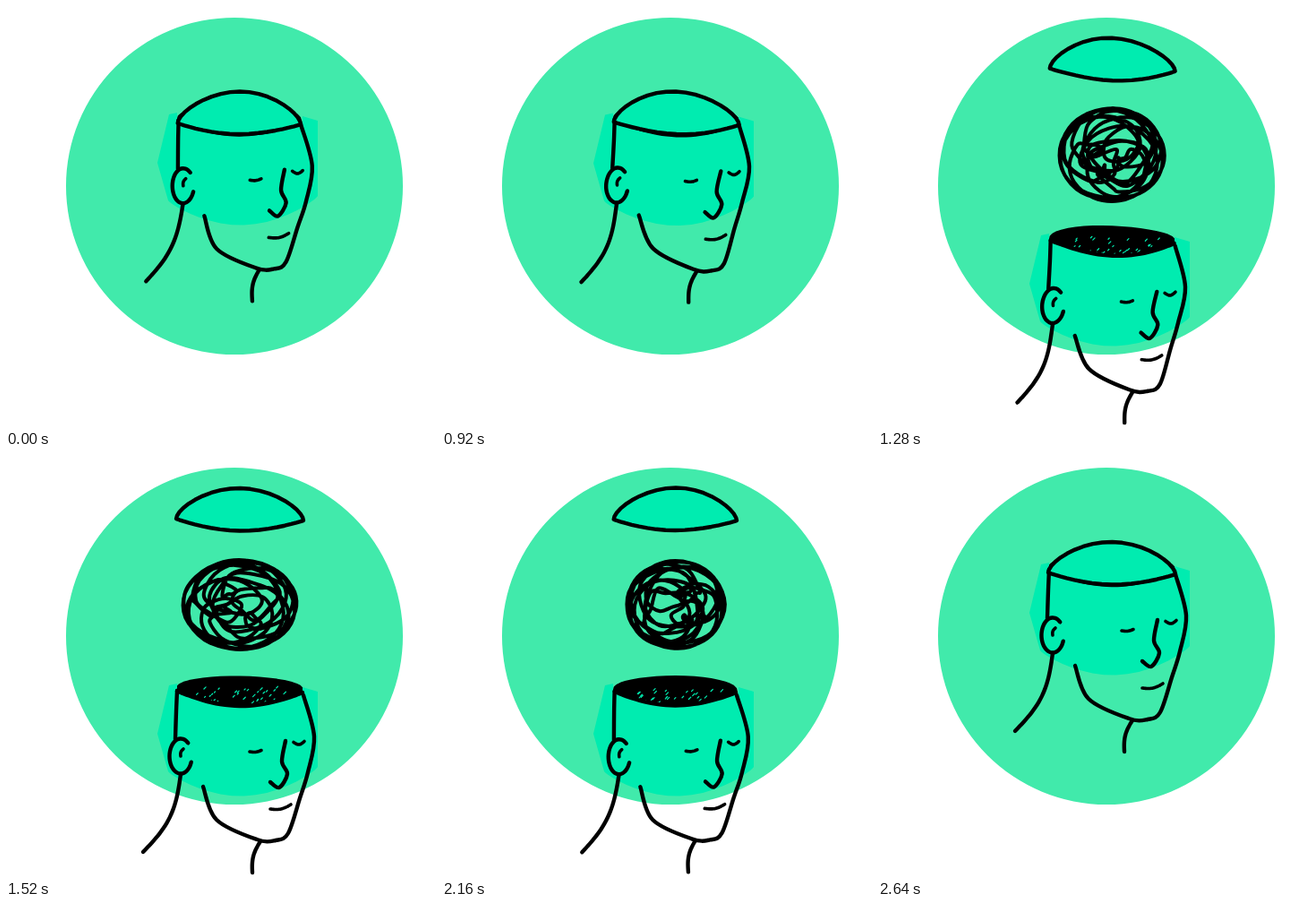
Write an HTML page with a canvas that moves like this. It is 480 px wide and 471 px high and loops after 2680 ms.

```html
<!DOCTYPE html>
<html lang="en">
<head>
<meta charset="utf-8">
<title>Open mind</title>
<style>
html, body { margin: 0; width: 100%; height: 100%; overflow: hidden; background: #fff; }
canvas { display: block; width: 480px; height: 471px; }
</style>
</head>
<body>
<canvas id="stage" width="480" height="471"></canvas>
<script>
const ctx = document.getElementById('stage').getContext('2d');
const LOOP = 2680, STEP = 40, HOLD = 120;
const GREEN = '#41eaab', TEAL = '#00ecb0', INK = '#000';

function random(seed) {
  return () => (seed = (seed * 16807 + 11) % 2147483647) / 2147483647;
}

// Arc of points between two ends; a lower power gives a flatter top.
function arch(x1, y1, x2, y2, rise, power = 1) {
  const dx = x2 - x1, dy = y2 - y1, len = Math.hypot(dx, dy), pts = [], n = 20;
  for (let i = 0; i <= n; i++) {
    const u = (1 - Math.cos(Math.PI * i / n)) / 2;
    const h = rise * Math.abs(Math.sin(Math.PI * u)) ** power / len;
    pts.push([x1 + dx * u + dy * h, y1 + dy * u - dx * h]);
  }
  return pts;
}

function oval(x, y, rx, ry, from, to) {
  const pts = [], n = 20;
  for (let i = 0; i <= n; i++) {
    const a = from + (to - from) * i / n;
    pts.push([x + rx * Math.cos(a), y + ry * Math.sin(a)]);
  }
  return pts;
}

// Smooth path through the points.
function smooth(pts) {
  const path = new Path2D();
  path.moveTo(...pts[0]);
  for (let i = 0; i < pts.length - 1; i++) {
    const b = pts[i], c = pts[i + 1], a = pts[i - 1] || b, d = pts[i + 2] || c;
    path.bezierCurveTo(
      b[0] + (c[0] - a[0]) / 6, b[1] + (c[1] - a[1]) / 6,
      c[0] - (d[0] - b[0]) / 6, c[1] - (d[1] - b[1]) / 6, c[0], c[1]);
  }
  return path;
}

function shape(pts) {
  const path = new Path2D();
  pts.forEach(p => path.lineTo(...p));
  path.closePath();
  return path;
}

// The closed head; the rim is where the skull opens.
const lid = [...arch(190, 130, 332, 132, 35, 0.6), ...arch(190, 130, 332, 132, -12.5, 0.9).reverse()];
const rimBack = arch(191, 127, 331, 129, 15.5, 0.35);
const rimFront = arch(191, 127, 331, 129, -16, 0.9);
const bold = [
  rimFront,
  [[191, 127], [190, 150], [189, 181]],
  oval(195, 200, 12.5, 19.5, -0.85, 0.35 - 2 * Math.PI),
  arch(195, 220, 153, 307, 10),
  [[220, 234], [235, 271], [280, 293], [301, 294], [315, 286], [328, 247], [337, 218], [344, 178], [332, 132]],
  arch(284, 295, 275, 330, -3.5),
  [[312, 183], [308, 206], [314, 220], [305, 235], [295, 229]]
];
const fine = [
  arch(198, 192, 195, 200, -1.4),
  arch(272, 195, 285, 193.5, -1.2),
  arch(321, 184.5, 333, 183.5, -3),
  arch(295, 259, 318, 254, -2.5)
];
const patch = shape([
  [348, 128], [331, 123], ...[...rimFront].reverse(), [191, 119], [182, 121], [169, 175],
  ...arch(181, 217, 348, 212, -30, 0.8)
]);

function speckle(seed) {
  const rnd = random(seed), path = new Path2D();
  for (let i = 0; i < 40; i++) {
    const x = 212 + rnd() * 112, y = 143 - rnd() ** 1.5 * 20, s = 1 + rnd() * 1.5;
    path.moveTo(x, y);
    path.lineTo(x + s, y - s);
  }
  return path;
}

// A redrawn head: slightly narrower and wavier than the base.
function redraw({ width, wave }, i) {
  const warp = pts => pts.map(([x, y]) => [
    260 + (x - 260) * width + wave * Math.sin(y / 25 + i),
    y + wave * Math.cos(x / 30 + i)]);
  return {
    lid: shape(warp(lid)),
    rim: shape(warp([...rimBack, ...[...rimFront].reverse()])),
    bold: bold.map(pts => smooth(warp(pts))),
    fine: fine.map(pts => smooth(warp(pts))),
    specks: speckle(101 + i * 5077)
  };
}

// Loops of varying size, each leaning out to the edge in its own direction.
function scribble([rx, ry], i) {
  const rnd = random(7919 * (i + 3)), pts = [], turns = 15, sides = 9;
  for (let k = 0; k <= turns * sides; k++) {
    const turn = k / sides, a = turn * 2 * Math.PI, lean = turn * 2.4 + i;
    const size = 0.54 + 0.2 * Math.sin(turn * 1.7 + i) + (rnd() - 0.5) * 0.14;
    const out = 0.98 - size;
    pts.push([
      261 + rx * (size * Math.cos(a) + out * Math.cos(lean)),
      166 + ry * (size * Math.sin(a) + out * Math.sin(lean))]);
  }
  return smooth(pts);
}

const heads = [{ width: 0.967, wave: 0.7 }, { width: 1, wave: 0 }, { width: 0.985, wave: 0.9 }].map(redraw);
const tangles = [[57, 57], [65, 51], [56, 50], [60, 53]].map(scribble);
const disc = shape(oval(255, 201, 188, 188, 0, 0));
disc.arc(255, 201, 188, 0, 2 * Math.PI);

function ease(t, from, to) {
  const u = Math.min(1, Math.max(0, (t - from) / (to - from)));
  return u * u * (3 - 2 * u);
}

function stroke(path, width, colour = INK) {
  ctx.lineWidth = width;
  ctx.strokeStyle = colour;
  ctx.stroke(path);
}

function fill(path, colour) {
  ctx.fillStyle = colour;
  ctx.fill(path);
}

function shifted(dy, paint) {
  ctx.save();
  ctx.translate(0, dy);
  paint();
  ctx.restore();
}

function draw(time) {
  const t = Math.floor(time % LOOP / STEP) * STEP;
  const open = ease(t, 910, 1190) - ease(t, 2160, 2402);
  const head = heads[Math.floor((t + 40) % (3 * HOLD) / HOLD)];
  const tangle = tangles[Math.floor((t + 80) % (4 * HOLD) / HOLD)];
  const drop = 135 * open, lift = -60 * open;

  ctx.clearRect(0, 0, 480, 471);
  ctx.lineCap = ctx.lineJoin = 'round';
  fill(disc, GREEN);
  shifted(drop, () => {
    fill(head.rim, INK);
    stroke(head.specks, 1.2, TEAL);
    stroke(head.rim, 4);
  });
  stroke(tangle, 4);
  shifted(drop, () => {
    fill(patch, TEAL);
    head.bold.forEach(line => stroke(line, 4.4));
    head.fine.forEach(line => stroke(line, 3.6));
  });
  shifted(lift, () => {
    fill(head.lid, TEAL);
    stroke(head.lid, 4.4);
  });
}

function tick() {
  draw(performance.now());
  requestAnimationFrame(tick);
}
tick();
</script>
</body>
</html>
```
